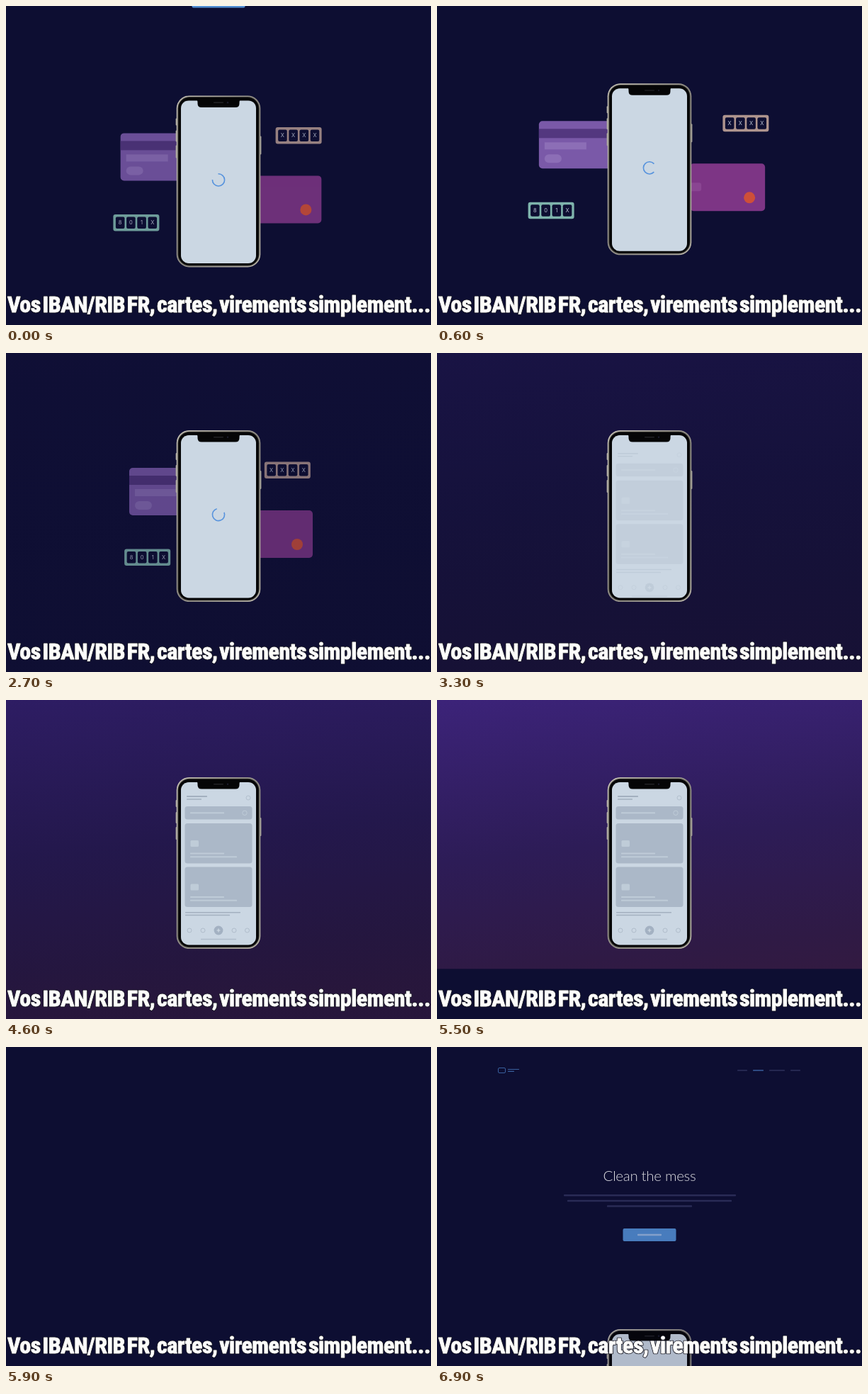
Recreate the animation shown at these times as an HTML page. Size 600x450 px, loop 7000 ms.

```html
<!DOCTYPE html>
<html lang="fr">
<head>
<meta charset="utf-8">
<title>Cartes et virements</title>
<style>
html, body { margin: 0; width: 100%; height: 100%; overflow: hidden; background: #0d0e32; }
svg { display: block; width: 100vw; height: 100vh; }
.caption {
  font-family: Impact, "Roboto Condensed", "Open Sans Condensed", Roboto, sans-serif;
  font-weight: 900; font-stretch: condensed; word-spacing: -.13em;
  fill: #fdfdfb; stroke: #fdfdfb; stroke-width: .9; stroke-linejoin: round;
}
.edge { stroke: #1b1b26; stroke-width: 2.6; }
.title { font: 300 20.5px Lato, sans-serif; letter-spacing: -.3px; fill: #fff; }
.digit { font: 400 7.5px Inter, sans-serif; fill: #c3cbdc; }
</style>
</head>
<body>
<svg viewBox="0 0 600 450">
  <defs>
    <linearGradient id="dusk" gradientUnits="userSpaceOnUse" x1="0" y1="0" x2="49" y2="452">
      <stop offset="0" stop-color="#3c2379"/>
      <stop offset=".5" stop-color="#2d1c57"/>
      <stop offset=".85" stop-color="#2f1a45"/>
      <stop offset="1" stop-color="#331a40"/>
    </linearGradient>
    <linearGradient id="steel" x1="0" y1="0" x2="1" y2="1">
      <stop offset="0" stop-color="#c3bfb3"/>
      <stop offset=".5" stop-color="#8f8c84"/>
      <stop offset="1" stop-color="#b5b1a5"/>
    </linearGradient>
  </defs>
  <rect width="600" height="450" fill="#0d0e32"/>
  <rect id="sky" width="600" height="450" fill="url(#dusk)"/>
  <g id="page">
    <g id="hero"></g>
    <!-- everything below is laid out for the fully scrolled page -->
    <g transform="translate(0 289)">
      <g id="violet"></g>
      <g id="magenta"></g>
      <g id="codeL"></g>
      <g id="codeR"></g>
      <g id="phone"></g>
      <g id="skeleton"></g>
      <path id="spinner" fill="none" stroke="#5793dd" stroke-width="1.6"/>
    </g>
  </g>
  <rect id="cover" width="600" height="450" fill="#0d0e32"/>
  <g id="captions"></g>
</svg>
<script>
const LOOP = 7000;
const CAPTION = 'Vos IBAN/RIB FR, cartes, virements simplement...';
const $ = id => document.getElementById(id);
const clamp = v => Math.max(0, Math.min(1, v));
const span = (t, a, b) => clamp((t - a) / (b - a));

const box = (x, y, w, h, fill, r = 0) =>
  `<rect x="${x}" y="${y}" width="${w}" height="${h}" rx="${r}" fill="${fill}"/>`;
const bar = (x1, x2, y, h, fill) => box(x1, y - h / 2, x2 - x1, h, fill, h / 3);
const dot = (x, y, r, fill) => `<circle cx="${x}" cy="${y}" r="${r}" fill="${fill}"/>`;
const ring = (x, y, r, color) =>
  `<circle cx="${x}" cy="${y}" r="${r}" fill="none" stroke="${color}"/>`;

function drawHero() {
  const blue = '#416eae', dim = '#343762', line = '#2f315c';
  $('hero').innerHTML =
    `<rect x="86.5" y="29.5" width="10" height="7" rx="1.5" fill="none" stroke="${blue}"/>` +
    bar(100, 116, 31.5, 1.2, blue) + bar(100, 109, 34.3, 1.2, blue) +
    bar(424, 438, 33, 1.4, dim) + bar(446, 461, 33, 1.4, blue) +
    bar(469, 491, 33, 1.4, dim) + bar(499, 513, 33, 1.4, dim) +
    '<text class="title" x="300" y="189" text-anchor="middle">Clean the mess</text>' +
    bar(179, 422, 209.3, 2.5, line) + bar(184, 416, 217, 2.5, line) +
    bar(240, 360, 224.5, 2.5, line) +
    box(262.5, 256, 75, 18, '#538fd3', 2) + bar(283, 317, 265, 2.4, '#98b9e2');
}

function drawCards() {
  $('violet').innerHTML =
    box(143, 162, 106, 67, '#7b5aa9', 5) + box(143, 173, 106, 13, '#543880') +
    box(151, 192, 59, 10, '#8d6fb8') + box(151, 209, 24, 12, '#8d6fb8', 6);
  $('magenta').innerHTML =
    box(358, 222, 106, 67, '#7e3686', 5) + box(350, 249, 24, 12, '#8b4693', 3) +
    dot(442, 270, 8, '#d0503a');
}

function drawCode(id, x, y, color, text) {
  $(id).innerHTML = box(x, y, 65, 23.5, color, 3) + [...text].map((c, i) => {
    const cx = x + 3.5 + i * 15.2;
    return box(cx, y + 3.5, 12.6, 16.5, '#0d0e32', 2) +
      `<text class="digit" x="${cx + 6.3}" y="${y + 14.6}" text-anchor="middle">${c}</text>`;
  }).join('');
}

function drawPhone() {
  const key = '#a5a298';
  $('phone').innerHTML =
    box(239.6, 141, 2, 10, key, 1) + box(239.6, 158, 2, 16, key, 1) +
    box(239.6, 179, 2, 18, key, 1) + box(358.4, 166, 2, 26, key, 1) +
    box(240.7, 109, 118.6, 242, 'url(#steel)', 18) +
    box(242.4, 110.7, 115.2, 238.6, '#3c3b38', 16.5) +
    box(243.4, 111.7, 113.2, 236.6, '#050506', 15.5) +
    box(247, 116, 106, 229.5, '#cbd7e3', 11) +
    '<path d="M269 115H331Q329.500 115.500 329.500 118V120Q329.500 125.500 324 125.500H276' +
    'Q270.500 125.500 270.500 120V118Q270.500 115.500 269 115Z" fill="#050506"/>' +
    bar(293, 307, 118.8, 1.4, '#222225') + dot(313, 118.8, 1.2, '#1b1c2c');
}

function drawSkeleton() {
  const slab = '#abb8c8', pale = '#bfccd8', ink = '#a3b0bf';
  const card = y => box(252.5, y, 95, 56.5, slab, 3.5) + box(260.5, y + 24, 11.5, 9, pale, 1.5) +
    bar(260, 308, y + 42.5, 2, pale) + bar(260, 326, y + 47.3, 2, pale);
  $('skeleton').innerHTML =
    bar(255, 284, 136, 1.8, ink) + bar(255, 276, 140, 1.6, ink) + ring(342, 138, 3, '#b3c0ce') +
    box(252.5, 150, 95, 18.5, slab, 3.5) + bar(260, 308, 159.3, 2, pale) + ring(337, 159.3, 3.2, pale) +
    card(174) + card(235.5) +
    bar(253, 331, 299.7, 1.5, ink) + bar(253, 316, 303.6, 1.5, ink) +
    [259, 278, 322, 340.5].map(x => ring(x, 325, 3, '#b0bdcb')).join('') +
    dot(300, 325, 6.4, '#a3b1c2') + bar(297.5, 302.5, 325, 1.2, '#d3dde7') +
    box(299.4, 322.5, 1.2, 5, '#d3dde7') + bar(275, 325, 337.5, 1.5, '#b0bdcb');
}

// Dark edge below, heavy white letters above; the largest size that fits the line
function drawCaption() {
  const group = $('captions');
  group.innerHTML = ['caption edge', 'caption']
    .map(c => `<text class="${c}" x="2" y="432">${CAPTION}</text>`).join('');
  const el = group.lastChild;
  for (let size = 32; size > 18; size -= 0.25) {
    group.style.fontSize = size + 'px';
    const gap = (597 - el.getComputedTextLength()) / CAPTION.length;
    if (gap > -0.8) {
      group.style.letterSpacing = gap.toFixed(3) + 'px';
      break;
    }
  }
}

function arc(cx, cy, r, from, to) {
  const at = deg => {
    const a = deg * Math.PI / 180;
    return (cx + r * Math.cos(a)).toFixed(2) + ' ' + (cy + r * Math.sin(a)).toFixed(2);
  };
  return `M${at(from)}A${r} ${r} 0 1 1 ${at(to)}`;
}

function scrollAt(t) {
  if (t >= 5900) return 271.5 * span(t, 6960, LOOP);
  return 289 - 17.5 * Math.exp(-t / 150);
}

function spreadAt(t) {
  if (t >= 5900) return 0.85 * span(t, 6960, LOOP);
  return clamp(1 - 0.15 * Math.exp(-t / 196) - Math.pow(span(t, 2100, 3150), 2.5));
}

function slide(id, p, dx) {
  $(id).setAttribute('transform', `translate(${((1 - p) * dx).toFixed(2)} 0)`);
  $(id).setAttribute('opacity', p.toFixed(3));
}

function render(t) {
  const away = t >= 5900;
  $('page').setAttribute('transform', `translate(0 ${(-scrollAt(t)).toFixed(2)})`);
  $('page').setAttribute('opacity', away ? span(t, 6650, 6940) : 1);

  const p = spreadAt(t);
  slide('violet', p, 125);
  slide('magenta', p, -125);
  slide('codeL', p, 160);
  slide('codeR', p, -160);

  const gap = 224 + t * 0.8265;
  $('spinner').setAttribute('d', arc(300, 228, 8.6, gap + 42, gap + 318));
  $('spinner').setAttribute('opacity', away ? 0 : 1 - span(t, 2900, 3200));

  const shown = away ? 0 : 1 - Math.pow(1 - span(t, 3200, 4200), 3);
  $('skeleton').setAttribute('opacity', shown);
  $('skeleton').setAttribute('transform', `translate(0 ${(8 * (1 - shown)).toFixed(2)})`);

  $('sky').setAttribute('opacity', away ? 0 : span(t, 2550, 5500));
  const rise = away ? 0 : Math.pow(span(t, 5239, 5900), 2);
  $('cover').setAttribute('y', (450 * (1 - rise)).toFixed(2));
  // the next section stays empty until the page fades back in
  $('cover').setAttribute('opacity', away ? 0 : 1);
}

drawHero();
drawCards();
drawCode('codeL', 127.5, 276.5, '#7fb5ad', '801X');
drawCode('codeR', 404.5, 153.5, '#b0968f', 'XXXX');
drawPhone();
drawSkeleton();
drawCaption();

const start = performance.now();
function tick() {
  render((performance.now() - start) % LOOP);
  requestAnimationFrame(tick);
}
tick();
</script>
</body>
</html>
```
